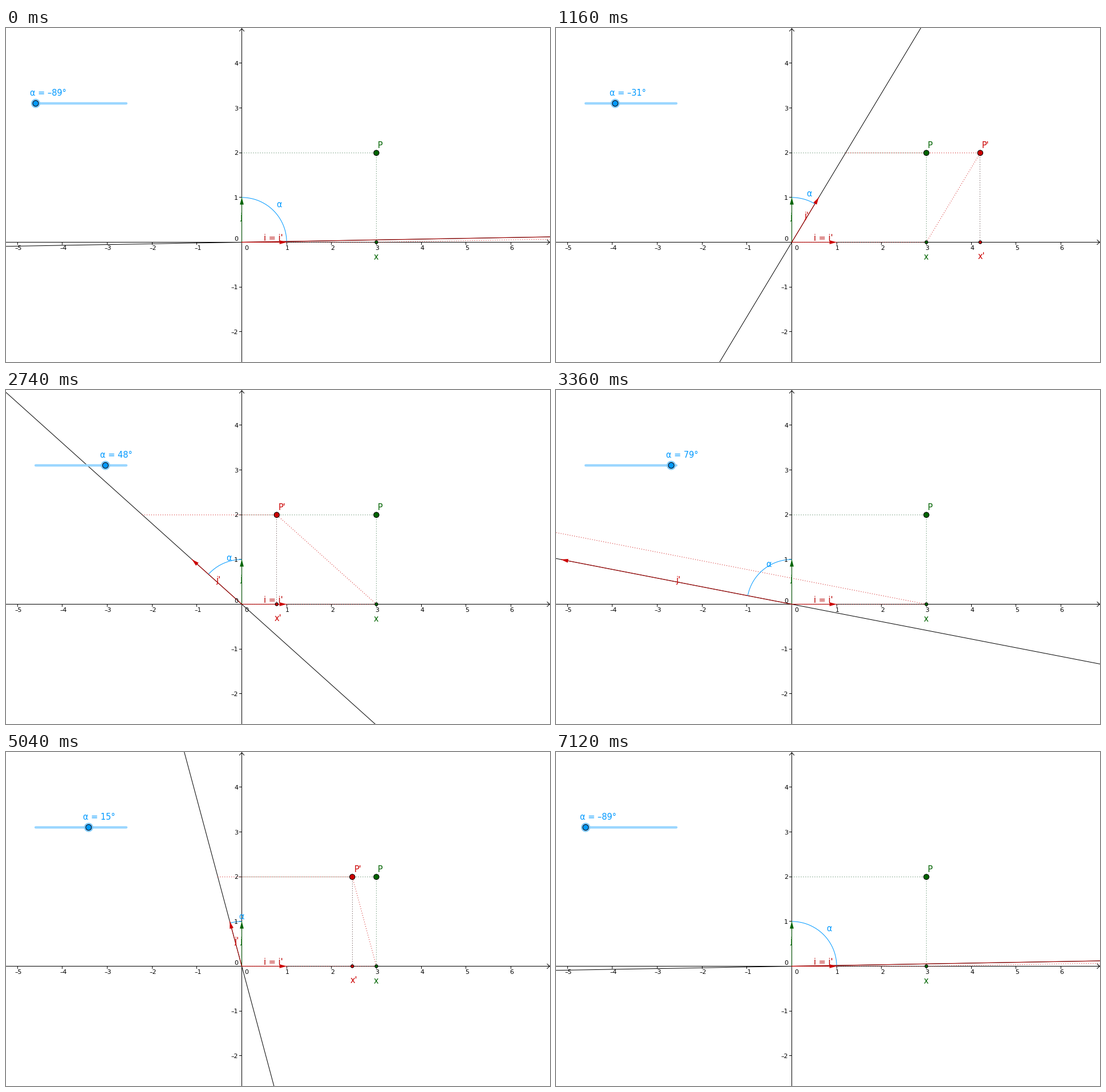
These frames come from a looping animation (954x587 px, 7.14 s). A matplotlib script:

```python
import numpy as np
import matplotlib.pyplot as plt
from matplotlib.animation import FuncAnimation
from matplotlib.patches import Circle, Polygon

W, H, DPI = 954, 587, 64
PX = 72 / DPI                   # points per pixel
OX, OY, UNIT = 413.5, 376.5, 78.65
SWEEP = 178                     # steps from -89 to 89 degrees
GREEN, RED, BLUE = "#006400", "#cc0000", "#0099ff"
LABEL, TICK = 14.5, 11

plt.rcParams["font.family"] = "DejaVu Sans"
plt.rcParams["toolbar"] = "None"
plt.rcParams["path.snap"] = False
fig = plt.figure(figsize=(W / DPI, H / DPI), dpi=DPI, facecolor="white")
ax = fig.add_axes([0, 0, 1, 1])
ax.set_xlim(0, W)
ax.set_ylim(H, 0)
ax.axis("off")


def sx(x):
    return OX + UNIT * x


def sy(y):
    return OY - UNIT * y


def crisp(v):
    """Centre of the pixel that holds v."""
    return np.floor(v) + 0.5


def line(xs=(), ys=(), color="black", width=1.0, z=2, **kw):
    return ax.plot(xs, ys, color=color, lw=width * PX, zorder=z, **kw)[0]


def dotted(xs=(), ys=(), color=RED, z=3):
    return line(xs, ys, color, 1, z, dashes=(1, 3), dash_capstyle="butt")


def text(x, y, s, color="black", size=LABEL, ha="left", z=8):
    return ax.text(x, y, s, color=color, fontsize=size * PX, ha=ha,
                   va="baseline", zorder=z, clip_on=True)


def dot(x, y, r, color, z=7):
    return ax.add_patch(Circle((x, y), r, fc=color, ec="black", lw=PX, zorder=z))


def head(x, y, dx, dy):
    """Triangle with its tip at (x, y), pointing along (dx, dy)."""
    n = np.hypot(dx, dy)
    ux, uy = dx / n, dy / n
    bx, by = x - 12.5 * ux, y - 12.5 * uy
    return [(x, y), (bx - 3.4 * uy, by + 3.4 * ux), (bx + 3.4 * uy, by - 3.4 * ux)]


def arrow(x, y, color, z):
    shaft = line([OX, x], [OY, y], color, 1.2, z, alpha=0.75)
    tip = ax.add_patch(Polygon(head(x, y, x - OX, y - OY), fc=color, lw=0, zorder=z))
    return shaft, tip


def number(k):
    return f"–{-k}" if k < 0 else str(k)


# Coordinate axes
line([0, W], [OY, OY])
line([OX, OX], [1, H])
line([W - 5, W - 0.5, W - 5], [OY - 4, OY, OY + 4])
line([OX - 4, OX, OX + 4], [5.5, 1, 5.5])
for k in range(-5, 7):
    if k:
        line([crisp(sx(k))] * 2, [OY, OY + 4])
        text(sx(k) + 1.4, 390.5, number(k), size=TICK, ha="center")
for k in range(-2, 5):
    if k:
        line([OX - 4, OX], [crisp(sy(k))] * 2)
        text(407, sy(k) + 4, number(k), size=TICK, ha="right")
text(421.5, 390.5, "0", size=TICK, ha="center")
text(407, 374.5, "0", size=TICK, ha="right")

# Fixed point and unit vectors
PXX, PYY = crisp(sx(3)), crisp(sy(2))
dotted([OX, PXX], [PYY, PYY], "#2f6b3f")
dotted([PXX, PXX], [PYY, OY], "#2f6b3f")
dotted([OX, PXX], [OY, OY], RED)
arrow(OX, sy(1), GREEN, 4)
arrow(sx(1), OY, RED, 5)
dot(PXX, PYY, 4.7, GREEN)
dot(PXX, OY, 2.7, GREEN)
text(652, 211.4, "P", GREEN)
text(644.8, 407.4, "x", GREEN)
text(410.6, 336.5, "j", GREEN)
text(452, 373.5, "i = i'", "#b80000")

# Slider
line([52, 211], [132.5, 132.5], "#99d6ff", 4.2, 3, solid_capstyle="round")
halo = ax.add_patch(Circle((52, 132.5), 8, fc="#80caff", lw=0, zorder=4))
knob = dot(52, 132.5, 5, BLUE)
value = text(43, 119, "", BLUE)

# Sheared parts
shear_line = line(z=2.5)
arc = line(color=BLUE, width=1, z=3.5)
alpha = text(0, 0, "α", BLUE)
j_shaft, j_tip = arrow(OX, sy(1), RED, 4.5)
j_label = text(0, 0, "j'", RED)
top = dotted()
side = dotted()
drop = dotted(color="#3c1e1e")
p_dot = dot(0, PYY, 4.7, RED)
x_dot = dot(0, OY, 2.7, RED)
p_label = text(0, 211.4, "P'", RED)
x_label = text(0, 406, "x'", RED)


def update(i):
    step = SWEEP - abs(SWEEP - i)
    deg = step - 89
    a = np.radians(deg)
    s, c, t = np.sin(a), np.cos(a), -np.tan(a)

    kx = 52 + 159 * step / SWEEP
    halo.center = knob.center = kx, 132.5
    value.set_x(kx - 9.5)
    value.set_text(f"α = {number(deg)}°")

    reach = np.array([-1200, 1200])
    shear_line.set_data(OX - s * reach, OY - c * reach)
    sweep = np.linspace(0, a, 60)
    arc.set_data(sx(-np.sin(sweep)), sy(np.cos(sweep)))
    alpha.set_position((sx(-np.sin(a / 2)) + 5.2, sy(np.cos(a / 2)) - 5))

    jx, jy = sx(t), sy(1)
    j_shaft.set_data([OX, jx], [OY, jy])
    j_tip.set_xy(head(jx, jy, jx - OX, jy - OY))
    mid = (OX + jx) / 2
    j_label.set_position((mid - 2.5 + 2 * (1 - c), 336.5 + 3 * s))
    j_label.set_visible(-10 < mid < W + 10)

    px = sx(3 + 2 * t)
    top.set_data([sx(2 * t), px], [PYY, PYY])
    side.set_data([PXX, px], [OY, PYY])
    drop.set_data([crisp(px)] * 2, [PYY, OY])
    p_dot.center = px, PYY
    x_dot.center = px, OY
    p_label.set_x(px + 3)
    x_label.set_x(px - 4)
    for part in (p_dot, x_dot, p_label, x_label, drop):
        part.set_visible(-6 < px < W + 6)
    return ()


anim = FuncAnimation(fig, update, frames=2 * SWEEP + 1, interval=20,
                     repeat=True, repeat_delay=0, blit=False)
plt.show()
```
